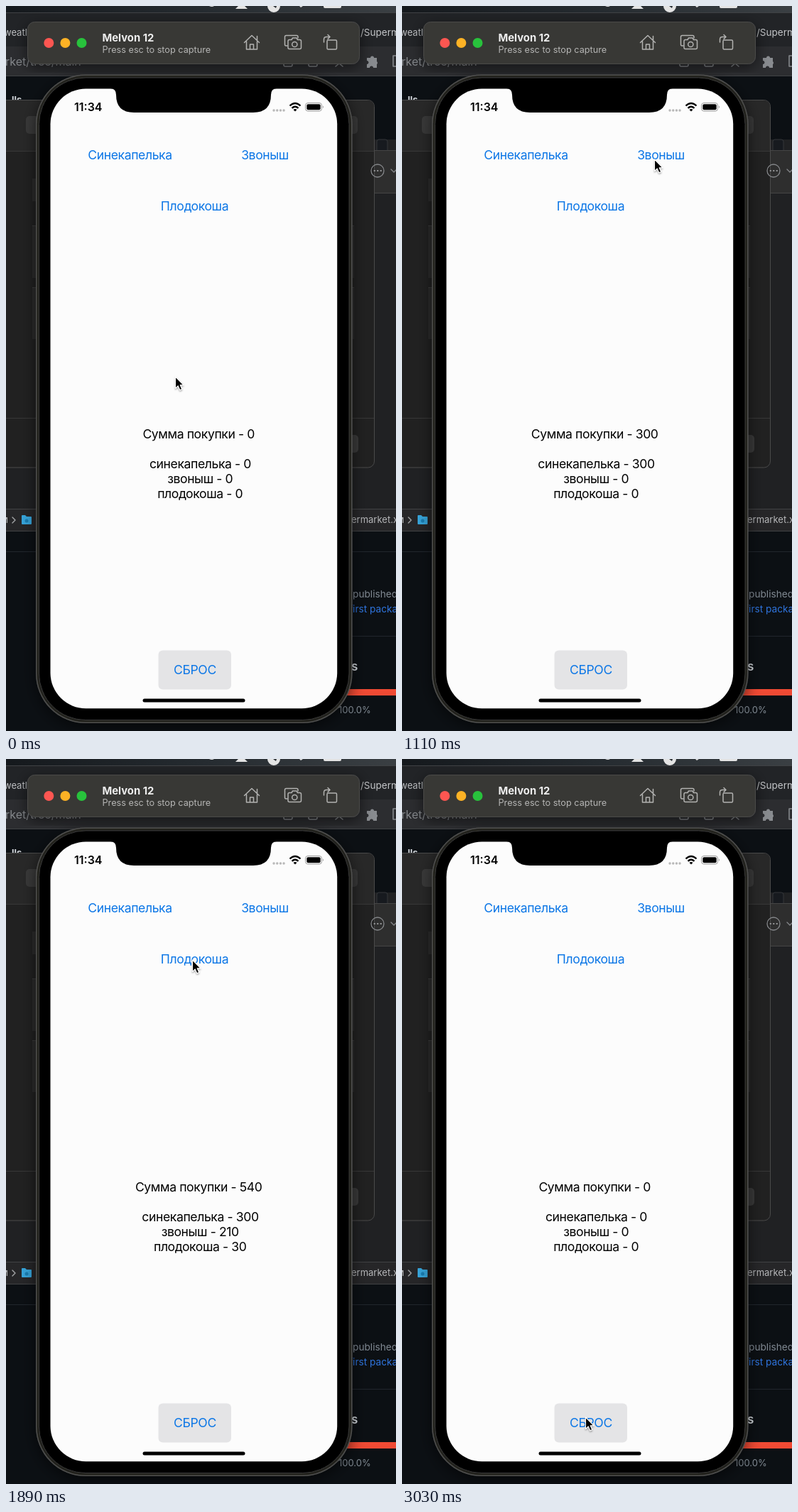
Animation of 549x1021 px, one loop 3.06 s. Source, as an HTML page:

```html
<!DOCTYPE html>
<html lang="ru">
<head>
<meta charset="utf-8">
<title>Simulator</title>
<style>
html, body { margin: 0; width: 100%; height: 100%; overflow: hidden; background: #0c1014 }
svg { display: block; width: 549px; height: 1021px }
text { font-family: Inter, "Open Sans", sans-serif; font-size: 13px; white-space: pre }
.app text { font-size: 17.6px; letter-spacing: -.4px; text-anchor: middle }
.link { fill: #0b76e6 }
.line { fill: none; stroke-linecap: round; stroke-linejoin: round }
</style>
</head>
<body>
<svg viewBox="0 0 549 1021">
  <defs>
    <filter id="soft" x="-20%" y="-20%" width="140%" height="140%"><feDropShadow dx="0" dy="5" stdDeviation="10" flood-opacity=".55"/></filter>
    <filter id="tip" x="-50%" y="-50%" width="200%" height="200%"><feDropShadow dx="0" dy="1.5" stdDeviation="1.3" flood-opacity=".4"/></filter>
    <linearGradient id="bar"><stop stop-color="#15191d"/><stop offset=".5" stop-color="#252b30"/><stop offset="1" stop-color="#3a3f43"/></linearGradient>
  </defs>

  <!-- browser behind -->
  <rect width="549" height="1021" fill="#0c1014"/>
  <rect width="549" height="10" fill="url(#bar)"/>
  <g fill="#e4e4e4">
    <path d="M327 0H336L340 4H323Z"/>
    <path d="M368 0A9 9 0 0 0 386 0H381L380 3L376 0Z"/>
    <path d="M447 0H472V1Q472 3 470 3H449Q447 3 447 1Z"/>
    <path d="M286 0Q290 2 293 0ZM413 0H418L415 2Z"/>
  </g>
  <rect y="9" width="549" height="49" fill="#222427"/>
  <rect y="57" width="549" height="42" fill="#2c2d30"/>
  <path d="M0 9.500H549M0 98.500H549" stroke="#404245"/>
  <text x="-3" y="42" fill="#bfc1c4">weatl</text>
  <text x="499" y="42" fill="#c4c6c9" style="font-size:13.500px">/Superm</text>
  <text x="-1" y="84" fill="#85888c" style="font-size:16px">rket/tree/main</text>
  <g class="line" stroke="#85888c" stroke-width="1.600">
    <rect x="391" y="73" width="12" height="12" rx="2"/>
    <rect x="426" y="73" width="12" height="12" rx="2"/>
    <path d="M464 85L469 81L474 85"/>
    <path d="M549 70H545V85H549"/>
  </g>
  <path d="M508 73H513A2.500 2.500 0 0 1 518 73H522V78A2.500 2.500 0 0 1 522 82V87H517A2.500 2.500 0 0 0 512 87H508V82A2.500 2.500 0 0 0 508 77Z" fill="#898c90"/>
  <text x="8" y="137" fill="#d3d7dc" font-weight="700">lls</text>

  <!-- editor windows -->
  <path d="M500 188H549V740H0V600H500Z" fill="#202123"/>
  <path d="M518 203H549V263H518Z" fill="#2e2e2e"/>
  <path d="M518 203.500H549M518 263.500H549" stroke="#454545"/>
  <path d="M522 203V191Q522 188 525 188H534Q537 188 537 191V203" fill="#171a1f" stroke="#34373b"/>
  <rect x="-20" y="132.500" width="538.500" height="517.500" rx="9" fill="#212121" stroke="#4a4a4a"/>
  <path d="M0 133H509Q518 133 518 142V204H0Z" fill="#282828"/>
  <path d="M0 204.500H518M0 580.500H518" stroke="#383838"/>
  <g fill="#393939">
    <rect x="28" y="155" width="30" height="25" rx="5"/>
    <rect x="465" y="155" width="30" height="25" rx="5"/>
    <rect x="465" y="604" width="31" height="25" rx="5"/>
  </g>
  <g fill="#2b2b2b">
    <rect x="37" y="243" width="20" height="32"/>
    <rect x="37" y="309" width="453" height="74"/>
    <rect x="37" y="396" width="453" height="73"/>
  </g>
  <path d="M37 309.500H490M37 396.500H490" stroke="#3b3b3b"/>
  <g class="line" stroke="#85878a" stroke-width="1.300">
    <circle cx="523" cy="232" r="9"/>
    <path d="M542 230L546 234L550 230"/>
  </g>
  <path d="M518.500 232H519M523 232H523.500M527.500 232H528" stroke="#98999b" stroke-width="2" stroke-linecap="round"/>
  <rect y="708" width="549" height="32" fill="#262628"/>
  <path d="M0 708.500H549M0 739.500H549" stroke="#414244"/>
  <text x="-7" y="728" fill="#b5b6b8">м</text>
  <path class="line" d="M9 720L13 724L9 728" stroke="#a2a4a6" stroke-width="1.400"/>
  <path d="M22 718Q22 717 23 717H27L29 719H35Q36 719 36 720V729Q36 730 35 730H23Q22 730 22 729Z" fill="#36a3d8"/>
  <circle cx="29" cy="725" r="2.500" fill="#197caf"/>
  <text x="486" y="728" fill="#b5b6b8">ermarket.x</text>

  <!-- repository page -->
  <path d="M0 768.500H549M480 887.500H549" stroke="#21262d"/>
  <text x="488" y="833" fill="#808992" style="font-size:13.700px">published</text>
  <text x="483" y="854" fill="#2f74dd" style="font-size:13.700px">first packages</text>
  <text x="486" y="936" fill="#d0d5da" font-weight="600" style="font-size:17px">s</text>
  <rect x="470" y="962" width="79" height="9" fill="#f04a34"/>
  <text x="468" y="996" fill="#818a93">100.0%</text>

  <!-- phone -->
  <g filter="url(#soft)">
    <rect x="42" y="96.500" width="445.500" height="913.500" rx="70" fill="#50504e"/>
    <rect x="43.500" y="98" width="442.500" height="910.500" rx="68.500" fill="#20201f"/>
    <rect x="46.500" y="101" width="436.500" height="904.500" rx="65.500" stroke="#3b3b3a"/>
  </g>
  <rect x="62.500" y="116.500" width="403.700" height="872.700" rx="50" fill="#fcfcfc"/>
  <path d="M147 116Q155 116.500 155 125Q155 150 180 150H348Q373 150 373 125Q373 116.500 381 116Z"/>
  <text x="96" y="148" font-weight="600" style="font-size:16px">11:34</text>
  <path d="M377 147H377.100M381.700 147H381.800M386.400 147H386.500M391 147H391.100" stroke="#b9b9b9" stroke-width="3.400" stroke-linecap="round"/>
  <path d="M399.500 140.500Q407 133.500 414.500 140.500M402.500 143.800Q407 139.600 411.500 143.800" fill="none" stroke="#000" stroke-width="2.300"/>
  <path d="M404.500 146Q407 143.800 409.500 146L407 148.500Z"/>
  <rect x="421.500" y="136.500" width="23" height="11.500" rx="3.500" fill="none" stroke="#9b9b9b"/>
  <rect x="423.300" y="138.300" width="19.400" height="7.900" rx="2"/>
  <path d="M446 140.500Q448 142.200 446 144Z" fill="#9b9b9b"/>
  <rect x="192.500" y="975.500" width="144" height="5" rx="2.500"/>
  <rect x="214.500" y="907.500" width="102.500" height="55" rx="6" fill="#e4e4e6"/>

  <g class="app">
    <text class="link" x="174.500" y="216">Синекапелька</text>
    <text class="link" x="364.500" y="216">Звоныш</text>
    <text class="link" x="265.500" y="288">Плодокоша</text>
    <text class="link" x="266" y="941">СБРОС</text>
    <text class="sum" x="271.200" y="609"></text>
    <text class="sum" x="273.500" y="651"></text>
    <text class="sum" x="273.200" y="672"></text>
    <text class="sum" x="273.200" y="693"></text>
  </g>

  <!-- simulator title bar -->
  <rect x="30.500" y="22.500" width="467" height="59" rx="10" fill="#373736" stroke="#4b4b4a" filter="url(#soft)"/>
  <circle cx="60.300" cy="52" r="7" fill="#fd5651"/>
  <circle cx="83.400" cy="52" r="7" fill="#fdb225"/>
  <circle cx="106.500" cy="52" r="7" fill="#28c23c"/>
  <text x="135.500" y="50" fill="#eee" font-weight="700" style="font-size:14.800px">Melvon 12</text>
  <text x="135.500" y="66" fill="#b5b5b4" style="font-size:12.700px">Press esc to stop capture</text>
  <g class="line" stroke="#b2b2b1" stroke-width="1.500">
    <path d="M335.500 51.500L346 41.500L356.500 51.500M338.500 50V61H353.500V50M343.500 61V54H348.500V61M353.500 48V42.500"/>
    <path d="M396 56H394Q392.500 56 392.500 54V43.500Q392.500 41.500 394.500 41.500H409Q411 41.500 411 43.500V45"/>
    <path d="M399 47.500H402L403.500 45H409L410.500 47.500H413.500Q415.500 47.500 415.500 49.500V58.500Q415.500 60.500 413.500 60.500H399Q397 60.500 397 58.500V49.500Q397 47.500 399 47.500Z"/>
    <circle cx="406.300" cy="54" r="3.600"/>
    <rect x="452" y="48" width="13.500" height="13" rx="1.500"/>
    <path d="M447.500 51V47Q447.500 43.500 451 43.500H456M453 40.500L456 43.500L453 46.500"/>
  </g>

  <path id="cursor" d="M-.5 -1V15.300L3.200 11.900L5.800 17.800L8.700 16.500L6.200 10.800H11Z" stroke="#fff" stroke-width="1.100" stroke-linejoin="round" filter="url(#tip)"/>
</svg>
<script>
const LOOP = 3060, STEP = 30;
const links = document.querySelectorAll('.link');
const sums = document.querySelectorAll('.sum');
const cursor = document.getElementById('cursor');
const goods = [
  { name: 'синекапелька', price: 100, taps: [480, 600, 720] },
  { name: 'звоныш', price: 70, taps: [1170, 1320, 1440] },
  { name: 'плодокоша', price: 30, taps: [1830, 1950, 2040] }
];
const reset = 2610;

// start, end, from x, from y, to x, to y
const moves = [
  [60, 360, 239, 523, 180, 208],
  [810, 1080, 180, 208, 356, 217],
  [1500, 1740, 356, 217, 263, 284],
  [2100, 2380, 263, 284, 252, 928],
  [2400, 2550, 252, 928, 259, 928]
];

function place(t) {
  const [a, b, x0, y0, x1, y1] = moves.filter(m => m[0] <= t).pop() || moves[0];
  const u = Math.min(1, Math.max(0, (t - a) / (b - a)));
  const k = u * u * (3 - 2 * u);
  return [x0 + (x1 - x0) * k, y0 + (y1 - y0) * k];
}

const pressed = (taps, t) => taps.some(s => t >= s - 40 && t < s + 20);

function draw(t) {
  const costs = goods.map(g => t < reset ? g.price * g.taps.filter(s => s <= t).length : 0);
  const total = costs.reduce((a, b) => a + b);
  sums[0].textContent = 'Сумма покупки - ' + total;
  goods.forEach((g, i) => sums[i + 1].textContent = `${g.name} - ${costs[i]}`);
  [...goods.map(g => g.taps), [reset]].forEach((taps, i) =>
    links[i].setAttribute('opacity', pressed(taps, t) ? .72 : 1));
  cursor.setAttribute('transform', `translate(${place(t)})`);
}

const start = performance.now();
function tick() {
  const t = (performance.now() - start) % LOOP;
  draw(Math.floor(t / STEP) * STEP);
  requestAnimationFrame(tick);
}
tick();
</script>
</body>
</html>
```
